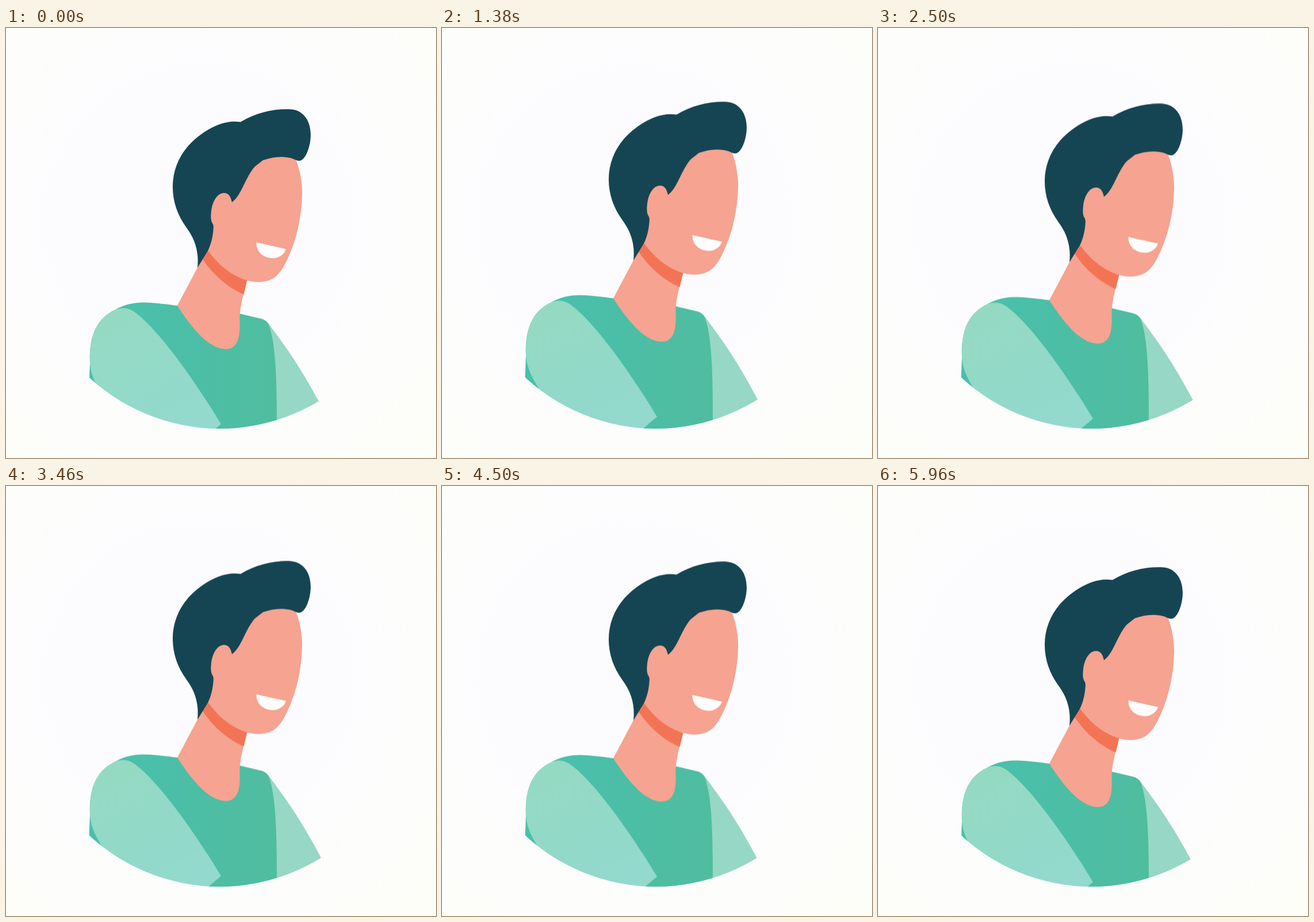
Recreate the animation shown at these times as an HTML page. Size 748x748 px, loop 6000 ms.

```html
<!DOCTYPE html>
<html lang="en">
<head>
<meta charset="utf-8">
<title>Portrait</title>
<style>
  html, body { margin: 0; width: 100%; height: 100%; overflow: hidden; }
  body { background: radial-gradient(circle at 45% 45%, #fcfcfe 45%, #fefef8 100%); }
  svg { display: block; width: 100%; height: 100%; }
  .skin { fill: #f6a391; }
  .figure { animation: bob 1s cubic-bezier(.333, 0, .667, 1) infinite alternate; }
  @keyframes bob {
    from { transform: translateY(0); }
    to { transform: translateY(-19px); }
  }
</style>
</head>
<body>
<svg viewBox="0 0 748 748">
  <defs>
    <clipPath id="disc"><circle cx="372" cy="363" r="334"/></clipPath>
    <linearGradient id="shirt" gradientUnits="userSpaceOnUse" x1="240" y1="0" x2="470" y2="0">
      <stop offset="0" stop-color="#4abfaa"/>
      <stop offset="1" stop-color="#50bd9f"/>
    </linearGradient>
    <linearGradient id="sleeve" gradientUnits="userSpaceOnUse" x1="200" y1="490" x2="300" y2="690">
      <stop offset="0" stop-color="#94dac2"/>
      <stop offset="1" stop-color="#93d9cd"/>
    </linearGradient>
  </defs>
  <!-- the disc stays still while the figure moves inside it -->
  <g clip-path="url(#disc)">
    <g class="figure">
      <!-- shirt -->
      <path fill="url(#shirt)" d="M140 740 L146 583 C144 535 158 505 190 490 C205 481 225 477 240 477.5
        C262 478 282 481 298 483 L407 497 L445 506 Q452 508 457 515 L475 540 V740Z"/>
      <path fill="url(#sleeve)" d="M146 583 C144 535 158 505 190 490 C200 486 212 486 222 493
        C262 520 328 612 374 689 L314 740 H240 L176 652 C160 627 148 608 146 583Z"/>
      <path fill="#97d7c6" d="M456 514 C490 557 523 608 551 663 L590 740 H471 V682
        C471 620 470 545 456 514Z"/>
      <!-- neck -->
      <path class="skin" d="M352 380 L338 402 L333 417 L298 483 C320 517 350 557 381 558.5
        C402 559 408 540 406.5 510 C406 497 409 480 413 463 L419 438Z"/>
      <path fill="#f37455" d="M352 387 L420 437 L413.5 463.5 C385 451 361 430 342 402Z"/>
      <!-- face -->
      <path class="skin" d="M500 220 L505 231 C513 251 516 278 515 292 C514 330 505 370 490 401
        C480 424 470 434 459 438.5 C447 443 433 443 419 439 C390 430 368 410 352 388
        L350 384 L355 345 L390 295 L430 230Z"/>
      <path fill="#fffdfd" d="M435.5 373 L487 384.5 C484 394 475 400.5 464 400.5
        C447 400 435 389 435.5 373Z"/>
      <!-- hair -->
      <path fill="#154553" d="M333 417 C336 390 329 367 313 346 C299 326 290 303 290 276
        C290 250 299 226 317 205 C340 180 376 158 408 163.5
        C435 147 467 140 496 141.5 C517 143 530 161 530 186 C530 206 521 231 510 231
        C506 231 503 229 498 227 C482 222 464 224 447 230 L433 241
        C417 258 409 293 393 303 L380 300 L361 341 C361 360 357 376 351 388Z"/>
      <path class="skin" d="M361 345 L360 341 C356 336 356 328 357 319 C359 301 368 287 379 287
        C388 287 391 294 393 303 L376 345Z"/>
    </g>
  </g>
</svg>
</body>
</html>
```
